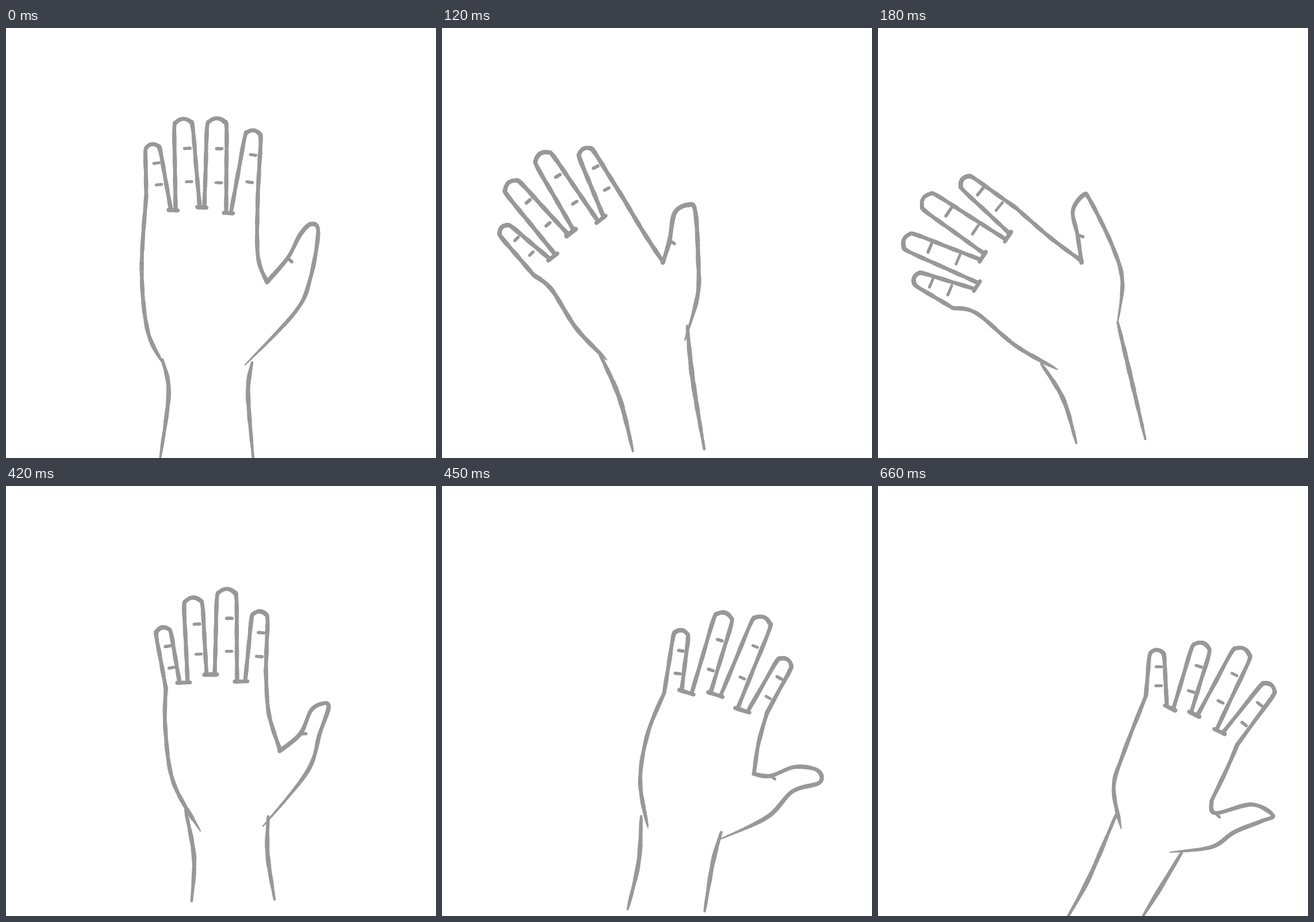
An HTML page with a canvas for the animation above (720 ms loop, 748 by 748 pixels).

```html
<!DOCTYPE html>
<html lang="en">
<head>
<meta charset="utf-8">
<title>Waving hand</title>
<style>
html, body { margin: 0; width: 100%; height: 100%; overflow: hidden; background: #fff; }
canvas { display: block; width: 748px; height: 748px; }
</style>
</head>
<body>
<canvas id="stage" width="748" height="748"></canvas>
<script>
const SIZE = 748, LOOP = 720;
const RADII = [13, 16, 17, 14]; // little, ring, middle, index fingertip
const CREASES = [0.33, 0.7];    // share of the way from tip to base

const mix = (a, b, t) => a + (b - a) * t;
const add = (p, d, k) => [p[0] + d[0] * k, p[1] + d[1] * k];
const blend = (p, q, t) => [mix(p[0], q[0], t), mix(p[1], q[1], t)];
const unit = (p, q) => {
  const len = Math.hypot(q[0] - p[0], q[1] - p[1]) || 1;
  return [(q[0] - p[0]) / len, (q[1] - p[1]) / len];
};
const points = text => text.split(' ').map(s => s.split(',').map(Number));

// gap: half width of a web; crease: half length of a crease
function pose(gap, crease, pen, joints) {
  const out = { gap, crease, pen };
  for (const key in joints) out[key] = points(joints[key]);
  return out;
}

const up = pose(4, 5, 7, {
  tips: '254,202 308,158 367,157 431,178',
  webs: '291,317 341,312 387,322',
  edge: '244,290 236,420 246,525 272,582',
  cleft: '438,290 438,395 454,442',
  thumb: '454,442 490,400 512,359 531,341 543,356 529,437 503,494 416,586',
  armL: '272,577 283,635 268,750',
  armR: '428,582 421,635 430,750'
});
const tilt = pose(6, 0, 8, {
  tips: '174,280 221,204 287,180 361,197',
  webs: '231,357 280,331 337,322',
  edge: '205,390 221,425 239,495 272,555',
  cleft: '393,310 406,368 417,420',
  thumb: '417,420 441,398 470,350 494,349 505,364 480,430 459,498 417,580',
  armL: '272,555 297,645 319,750',
  armR: '437,530 434,620 447,750'
});
const left = pose(6, 9, 7, {
  tips: '63,434 45,368 79,296 147,263',
  webs: '172,449 182,398 226,363',
  edge: '130,487 171,496 240,553 312,594',
  cleft: '240,313 300,365 354,405',
  thumb: '354,408 347,360 339,318 357,291 369,300 408,380 425,440 417,512',
  armL: '284,584 322,645 345,722',
  armR: '417,512 438,600 465,715'
});
const middle = pose(7, 5, 7, {
  tips: '272,246 325,194 384,179 442,218',
  webs: '309,342 356,328 409,340',
  edge: '278,352 277,420 291,515 338,600',
  cleft: '452,320 457,395 477,460',
  thumb: '476,461 512,431 531,390 553,378 561,386 546,430 524,497 447,592',
  armL: '312,563 327,645 323,722',
  armR: '456,575 455,640 467,719'
});
const right = pose(11, 4, 7, {
  tips: '552,293 640,293 706,327 710,423',
  webs: '527,404 573,426 609,466',
  edge: '485,392 430,457 398,520 383,586',
  cleft: '640,490 622,520 597,552',
  thumb: '597,552 603,578 650,594 692,627 681,656 628,630 575,648 508,643',
  armL: '381,586 357,660 321,745',
  armR: '510,630 487,668 446,750'
});
const back = pose(6, 5, 7, {
  tips: '485,285 565,273 637,283 684,346',
  webs: '508,386 550,397 594,427',
  edge: '466,365 427,465 410,525 423,596',
  cleft: '625,450 607,492 580,548',
  thumb: '580,548 587,569 650,554 687,573 667,583 620,602 580,628 508,637',
  armL: '414,572 368,680 330,750',
  armR: '528,638 492,698 460,750'
});

const wrist = p => blend(p.edge[p.edge.length - 1], p.thumb[p.thumb.length - 1], 0.5);

// Swing every joint around the moving wrist
function between(a, b, t) {
  const from = wrist(a), to = wrist(b), pivot = blend(from, to, t);
  const polar = (p, o) => [Math.atan2(p[0] - o[0], o[1] - p[1]), Math.hypot(p[0] - o[0], p[1] - o[1])];
  const swing = (p, q) => {
    const [u, r] = polar(p, from), [v, s] = polar(q, to);
    const angle = u + Math.atan2(Math.sin(v - u), Math.cos(v - u)) * t;
    return add(pivot, [Math.sin(angle), -Math.cos(angle)], mix(r, s, t));
  };
  const out = {};
  for (const key in a) {
    out[key] = Array.isArray(a[key]) ? a[key].map((p, i) => swing(p, b[key][i])) : mix(a[key], b[key], t);
  }
  return out;
}

const ctx = document.getElementById('stage').getContext('2d');
ctx.strokeStyle = '#989898';
ctx.lineCap = 'round';

const even = () => 1;
const fade = t => Math.min(1, 0.3 + (1 - t) * 6);
const swell = t => 0.6 + 0.5 * Math.sin(Math.PI * t);

// Pencil line: Catmull-Rom curve whose weight follows a profile
function line(pts, pen, weight = even) {
  const at = i => pts[Math.max(0, Math.min(pts.length - 1, i))];
  const spans = pts.length - 1, steps = 12;
  let last = pts[0];
  for (let n = 1; n <= spans * steps; n++) {
    const i = Math.floor((n - 1) / steps), t = n / steps - i;
    const [a, b, c, d] = [at(i - 1), at(i), at(i + 1), at(i + 2)];
    const p = b.map((v, j) => v + t / 2 * (c[j] - a[j] +
      t * (2 * a[j] - 5 * v + 4 * c[j] - d[j] + t * (3 * (v - c[j]) + d[j] - a[j]))));
    ctx.lineWidth = pen * weight(n / (spans * steps)) * (1 + 0.08 * Math.sin(p[0] * 0.13 + p[1] * 0.17));
    ctx.beginPath();
    ctx.moveTo(...last);
    ctx.lineTo(...p);
    ctx.stroke();
    last = p;
  }
}

function finger(from, to, tip, r, crease, pen) {
  const base = blend(from, to, 0.5), dir = unit(base, tip), side = [-dir[1], dir[0]];
  const centre = add(tip, dir, -r);
  const cap = [];
  for (let k = -2; k <= 2; k++) {
    const a = k * Math.PI / 4;
    cap.push(add(add(centre, side, r * Math.sin(a)), dir, r * Math.cos(a)));
  }
  line([from, blend(from, cap[0], 0.5), ...cap, blend(cap[4], to, 0.5), to], pen);
  if (!crease) return;
  for (const share of CREASES) {
    const mid = add(blend(tip, base, share), side, r * 0.3);
    line([add(mid, side, -crease), add(mid, side, crease)], pen * 0.7);
  }
}

function draw(p) {
  const { gap, crease, pen, webs, edge, cleft, thumb } = p;
  const across = unit(webs[0], webs[2]);
  const starts = [edge[0], ...webs.map(w => add(w, across, gap))];
  const ends = [...webs.map(w => add(w, across, -gap)), cleft[0]];

  ctx.clearRect(0, 0, SIZE, SIZE);
  p.tips.forEach((tip, i) => finger(starts[i], ends[i], tip, RADII[i], crease, pen));
  webs.forEach(w => line([add(w, across, -gap - 4), add(w, across, gap + 4)], pen));
  line(edge, pen, fade);
  line(cleft, pen);
  line(thumb, pen, fade);
  line([thumb[1], add(thumb[1], unit(thumb[1], thumb[5]), 10)], pen * 0.7);
  line(p.armL, pen, swell);
  line(p.armR, pen, swell);
}

// [start time, drawing]
const shots = [
  [0, up], [60, tilt], [120, between(tilt, left, 0.5)], [180, left],
  [330, between(left, middle, 0.5)], [420, middle],
  [450, between(middle, right, 0.5)], [510, right], [660, back]
];

let shown = null;
function tick(now) {
  const time = now % LOOP;
  const shot = shots.filter(s => s[0] <= time).pop() || shots[0];
  if (shot !== shown) draw((shown = shot)[1]);
  requestAnimationFrame(tick);
}
tick(performance.now());
</script>
</body>
</html>
```
